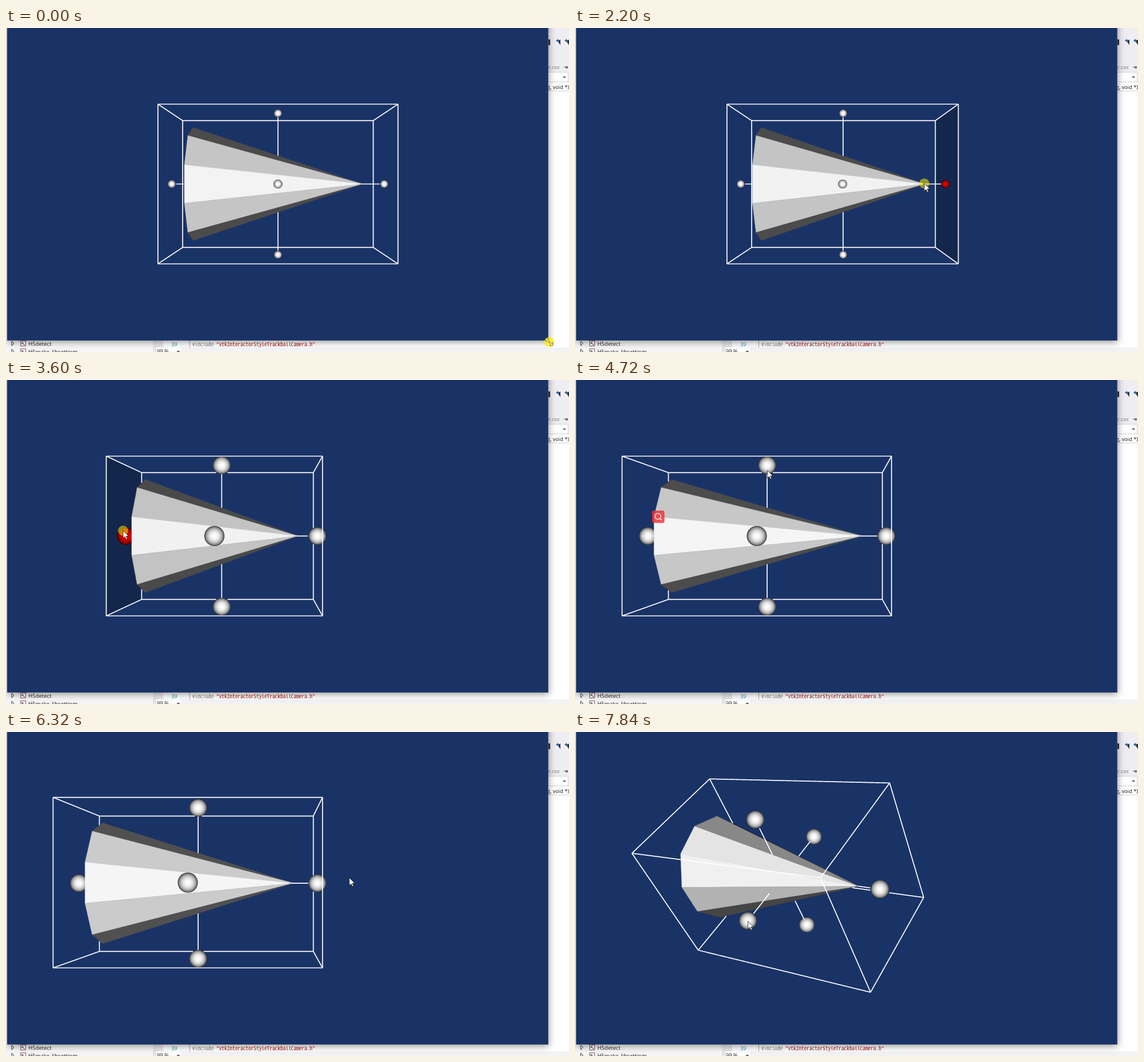
Animation of 985 by 568 pixels, one loop 8 s. Source, as an HTML page with a canvas:

```html
<!DOCTYPE html>
<html lang="en">
<head>
<meta charset="utf-8">
<title>Box widget</title>
<style>
html, body { margin: 0; width: 100%; height: 100%; overflow: hidden; background: #fff; }
canvas { display: block; }
</style>
</head>
<body>
<canvas id="stage" width="985" height="568"></canvas>
<script>
const ctx = document.getElementById("stage").getContext("2d");
const LOOP = 8000, FOCAL = 1026, DIST = 10.35, CX = 475.8, CY = 273.5;
const UNIT = FOCAL / DIST, RELEASE = 3040;
const COS18 = Math.cos(Math.PI / 10), HALF_Z = 1.25 * COS18;
const UI = '"Open Sans", "Noto Sans", sans-serif';

const within = (t, a, b) => t >= a && t < b;
const dot = (a, b) => a[0] * b[0] + a[1] * b[1] + a[2] * b[2];
const sub = (a, b) => a.map((v, i) => v - b[i]);

// Eased progress from 0 to 1 between two times
function ramp(t, a, b) {
  const k = Math.min(1, Math.max(0, (t - a) / (b - a)));
  return k * k * (3 - 2 * k);
}

// Eased run through evenly timed values
function sweep(t, a, b, ...values) {
  const step = (b - a) / (values.length - 1);
  return values.reduce((sum, v, i) => i ? sum + (v - values[i - 1]) * ramp(t, a + (i - 1) * step, a + i * step) : v, 0);
}

// The dragged faces of the box
const right = t => sweep(t, 1520, 2348, 1.875, 2.1, 2.183, 1.2) + sweep(t, 2400, RELEASE, 0, 0.724, -0.504);
const left = t => sweep(t, 3400, 3806, -1.875, -3.513);
const top_ = t => sweep(t, 5200, 5930, 1.25, 1, 1.527) - 0.108 * ramp(t, 6040, 6120);

// Button presses: from, until, grabbed axis and side
const presses = [
  { from: 0, until: 160 },
  { from: 1520, until: RELEASE, axis: 0, side: 1 },
  { from: 3400, until: 4200, axis: 0, side: 0 },
  { from: 5040, until: 6120, axis: 1, side: 1 },
  { from: 6380, until: 7400 }
];
const pressAt = t => presses.find(p => within(t, p.from, p.until));

// The pointer glides between stops; the box lags behind it while dragged
function pointer(t) {
  let x = 950 + UNIT * (right(t + 75) - 1.875);
  let y = 550 - UNIT * (top_(t + 144) - 1.25);
  const glide = (a, b, dx, dy) => {
    const k = ramp(t, a, b);
    x += dx * k;
    y += dy * k;
  };
  glide(120, 520, -405, -274);
  glide(680, 1000, -67, 10);
  glide(1000, 1440, 183, -14);
  glide(3320, 3400, -257, -8);
  glide(3400, 3806, -168, -1);
  glide(4200, 4720, 217, -105);
  glide(5200, 5640, 12, 0);
  glide(6120, 6380, 290, 131);
  glide(6380, 6840, -51, 66);
  glide(6920, 7240, -115, 40);
  glide(7400, 7840, -170, -47);
  return [x + 0.5, y + 0.5];
}

function spin(a, b, angle) {
  const c = Math.cos(angle), s = Math.sin(angle);
  return [a * c - b * s, a * s + b * c];
}

function camera(t) {
  const a = ramp(t, 6380, 6840), b = ramp(t, 6920, 7240);
  const yaw = 0.13 * a + 0.617 * b, pitch = 0.396 * a + 0.273 * b, roll = 0.04 * a + 0.3445 * b;
  return ([x, y, z]) => {
    [x, z] = spin(x, z, yaw);
    [y, z] = spin(y, z, pitch);
    [x, y] = spin(x, y, roll);
    return [x, y, z];
  };
}

function scene(t) {
  const turn = camera(t);
  const lo = [left(t), -1.25, -HALF_Z], hi = [right(t), top_(t), HALF_Z];
  const mid = lo.map((v, i) => (v + hi[i]) / 2);
  const scale = [(hi[0] - lo[0]) / 3.75, (hi[1] - lo[1]) / 2.5, 1];
  const eye = [[1, 0, 0], [0, 1, 0], [0, 0, 1]].map(a => turn(a)[2] * DIST);
  const project = p => {
    const [x, y, z] = turn(p), k = FOCAL / (DIST - z);
    return [CX + x * k, CY - y * k, k];
  };
  const press = pressAt(t);
  const grab = press && "axis" in press ? press : null;
  const handles = [];
  for (let axis = 0; axis < 3; axis++) for (let side = 0; side < 2; side++) {
    const p = mid.slice();
    p[axis] = side ? hi[axis] : lo[axis];
    const red = !!grab && grab.axis === axis && grab.side === side;
    handles.push({ p, red, front: axis === 2 && side === 1 });
  }
  return { turn, lo, hi, mid, scale, eye, project, handles, grab, radius: t < RELEASE ? 0.07 : 0.157 };
}

// The cone as half-spaces: ten sides and the base
const sideNormal = i => {
  const a = (i + 0.5) * Math.PI / 5;
  return [COS18 / 3, Math.cos(a), Math.sin(a)];
};
const planes = Array.from({ length: 10 }, (_, i) => ({ n: sideNormal(i), k: COS18 / 2 }));
planes.push({ n: [-1, 0, 0], k: 1.5 });

function hidden(s, p) {
  const local = q => q.map((v, i) => (v - s.mid[i]) / s.scale[i]);
  const e = local(s.eye), q = local(p);
  let near = 0, far = 1;
  for (const { n, k } of planes) {
    const a = dot(n, e) - k, b = dot(n, q) - k;
    if (a > 0 && b > 0) { near = 2; break; }
    if (a > 0) near = Math.max(near, a / (a - b));
    else if (b > 0) far = Math.min(far, a / (a - b));
  }
  if (near < far && near < 0.999) return true;
  const d = sub(p, s.eye), dd = dot(d, d);
  return s.handles.some(h => {
    const m = sub(s.eye, h.p), b = dot(m, d);
    const disc = b * b - dd * (dot(m, m) - s.radius ** 2);
    return disc > 0 && (-b - Math.sqrt(disc)) / dd < 0.999;
  });
}

function polygon(points, fill) {
  ctx.beginPath();
  points.forEach(p => ctx.lineTo(p[0], p[1]));
  ctx.closePath();
  ctx.fillStyle = fill;
  ctx.fill();
}

function drawLine(s, a, b) {
  const N = 240;
  let open = false;
  ctx.beginPath();
  for (let i = 0; i <= N; i++) {
    const p = a.map((v, j) => v + (b[j] - v) * i / N);
    if (hidden(s, p)) { open = false; continue; }
    const [x, y] = s.project(p);
    open ? ctx.lineTo(x, y) : ctx.moveTo(x, y);
    open = true;
  }
  ctx.stroke();
}

function drawCone(s) {
  const place = p => s.project(p.map((v, i) => s.mid[i] + v * s.scale[i]));
  const rim = i => place([-1.5, Math.cos(i * Math.PI / 5), Math.sin(i * Math.PI / 5)]);
  const apex = place([1.5, 0, 0]);
  for (let i = 0; i < 10; i++) {
    const a = rim(i), b = rim(i + 1);
    if ((b[0] - a[0]) * (apex[1] - a[1]) - (b[1] - a[1]) * (apex[0] - a[0]) > 0) continue;
    const n = sideNormal(i).map((v, j) => v / s.scale[j]);
    const g = Math.round(255 * Math.max(0.06, s.turn(n)[2] / Math.hypot(...n)));
    polygon([a, b, apex], `rgb(${g},${g},${g})`);
    ctx.strokeStyle = ctx.fillStyle;
    ctx.lineWidth = 0.4;
    ctx.stroke();
  }
}

function drawHandle(s, h) {
  const [x, y, k] = s.project(h.p), r = s.radius * k;
  const g = ctx.createRadialGradient(x, y, 0, x, y, r);
  for (let i = 0; i <= 12; i++) {
    const q = Math.sin(i * Math.PI / 24);
    const v = Math.round(255 * Math.max(0.16, Math.sqrt(1 - q * q)));
    g.addColorStop(q, h.red ? `rgb(${Math.round(v * 0.92)},0,0)` : `rgb(${v},${v},${v})`);
  }
  disc(x, y, r, g);
}

function disc(x, y, r, fill) {
  ctx.fillStyle = fill;
  ctx.beginPath();
  ctx.arc(x, y, r, 0, 7);
  ctx.fill();
}

function drawWidget(t) {
  const s = scene(t);
  const square = [[0, 0], [0, 1], [1, 1], [1, 0]];
  const corner = (pair, axis, side) => {
    const bits = pair.slice();
    bits.splice(axis, 0, side);
    return bits.map((b, i) => b ? s.hi[i] : s.lo[i]);
  };
  if (s.grab) polygon(square.map(c => s.project(corner(c, s.grab.axis, s.grab.side))), "#13264b");
  s.handles.filter(h => !h.front).forEach(h => drawHandle(s, h));
  drawCone(s);
  s.handles.filter(h => h.front).forEach(h => drawHandle(s, h));
  ctx.strokeStyle = "#fff";
  ctx.lineWidth = 1.7;
  for (let axis = 0; axis < 3; axis++) {
    square.forEach(c => drawLine(s, corner(c, axis, 0), corner(c, axis, 1)));
    drawLine(s, s.handles[axis * 2].p, s.handles[axis * 2 + 1].p);
  }
}

function rect(x, y, w, h, fill) {
  ctx.fillStyle = fill;
  ctx.fillRect(x, y, w, h);
}

function text(str, x, y, size, fill, font = UI) {
  ctx.font = `${size}px ${font}`;
  ctx.fillStyle = fill;
  ctx.fillText(str, x, y);
}

const dropArrow = (x, y) => polygon([[x - 3, y], [x + 3, y], [x, y + 3]], "#555");

function treeRow(label, y) {
  ctx.strokeStyle = "#333";
  ctx.lineWidth = 1;
  ctx.beginPath();
  ctx.moveTo(10, y - 4);
  ctx.lineTo(14, y);
  ctx.lineTo(10, y + 4);
  ctx.closePath();
  ctx.stroke();
  ctx.strokeStyle = "#8c5a72";
  ctx.strokeRect(25.5, y - 4.5, 9, 9);
  ctx.strokeStyle = "#222";
  ctx.beginPath();
  ctx.moveTo(27, y - 2);
  ctx.lineTo(33, y + 3);
  ctx.moveTo(27, y + 1);
  ctx.lineTo(30, y - 2);
  ctx.stroke();
  text(label, 39, y + 4, 9.6, "#1e1e1e");
}

function drawDesktop() {
  rect(0, 0, 985, 568, "#fff");
  rect(940, 0, 45, 111, "#eeeef2");
  rect(940, 77, 45, 34, "#fff");
  for (const y of [77, 94, 110]) rect(940, y, 45, 1, "#cccedb");
  rect(983, 78, 1, 16, "#cccedb");
  dropArrow(977, 85);
  rect(948, 20, 4, 10, "#333");
  for (const x of [962, 977]) {
    polygon([[x, 22], [x + 4, 19], [x + 4, 25]], "#2067b0");
    rect(x + 3, 21, 4, 2, "#2067b0");
    polygon([[x + 4, 24], [x + 8, 20], [x + 8, 30]], "#333");
  }
  text("r.cxx", 949, 72, 9, "#777");
  rect(976, 68, 3, 1, "#666");
  rect(979, 67, 4, 4, "#777");
  text("g, void *)", 947, 107, 9.2, "#111");

  rect(0, 540, 258, 28, "#f6f6f6");
  treeRow("H5detect", 553);
  treeRow("H5make_libsettings", 567);
  rect(257, 540, 6, 28, "#e4e4ea");
  rect(263, 540, 12, 20, "#e6e7e8");
  text("39", 289, 558, 9.3, "#2b91af");
  rect(321, 548, 1, 12, "#a5a5a5");
  const mono = '"Noto Sans Mono CJK SC", "Noto Sans Mono CJK JP", "Liberation Mono", monospace';
  text("#include ", 326, 558, 9.33, "#808080", mono);
  text('"vtkInteractorStyleTrackballCamera.h"', 368, 558, 9.33, "#a31515", mono);
  rect(263, 560, 722, 8, "#f3f3f6");
  rect(263, 560, 43, 8, "#fff");
  text("99 %", 264, 570, 9.3, "#222");
  dropArrow(301.5, 566);

  ctx.save();
  ctx.shadowColor = "rgba(0,0,0,0.45)";
  ctx.shadowBlur = 12;
  ctx.shadowOffsetY = 2;
  rect(2, -30, 947, 578, "#1a3366");
  ctx.restore();
  rect(948, 0, 1, 548, "#4b587a");
  rect(2, 547, 947, 1, "#33466f");
}

function drawSearchBadge() {
  ctx.fillStyle = "rgba(235,55,60,0.85)";
  ctx.beginPath();
  ctx.roundRect(135, 229, 21.5, 21.5, 3);
  ctx.fill();
  ctx.strokeStyle = "#fff";
  ctx.lineWidth = 1.2;
  ctx.beginPath();
  ctx.arc(145, 239, 5.2, 0, 7);
  ctx.moveTo(149, 243);
  ctx.lineTo(152, 246);
  ctx.stroke();
}

function drawPointer(t) {
  const [x, y] = pointer(t), resizing = t < 160;
  if (pressAt(t)) disc(x, y, 8.8, `rgba(255,240,0,${resizing ? 0.75 : 0.53})`);
  ctx.save();
  ctx.translate(x, y);
  ctx.lineWidth = 0.8;
  if (resizing) {
    ctx.strokeStyle = "#6b6420";
    for (const turn of [1, 5]) {
      ctx.save();
      ctx.rotate(turn * Math.PI / 4);
      polygon([[0, -1], [5, -1], [5, -4], [9, 0], [5, 4], [5, 1], [0, 1]], "#fff79a");
      ctx.stroke();
      ctx.restore();
    }
  } else {
    ctx.strokeStyle = "#111";
    polygon([[0, 0], [0, 13.5], [3.2, 10.6], [5.4, 15.5], [7.5, 14.6], [5.3, 9.8], [9.6, 9.6]], "#fff");
    ctx.stroke();
  }
  ctx.restore();
}

function draw(now) {
  const t = now % LOOP;
  drawDesktop();
  drawWidget(t);
  if (within(t, 4240, 5040)) drawSearchBadge();
  drawPointer(t);
  requestAnimationFrame(draw);
}
requestAnimationFrame(draw);
</script>
</body>
</html>
```
